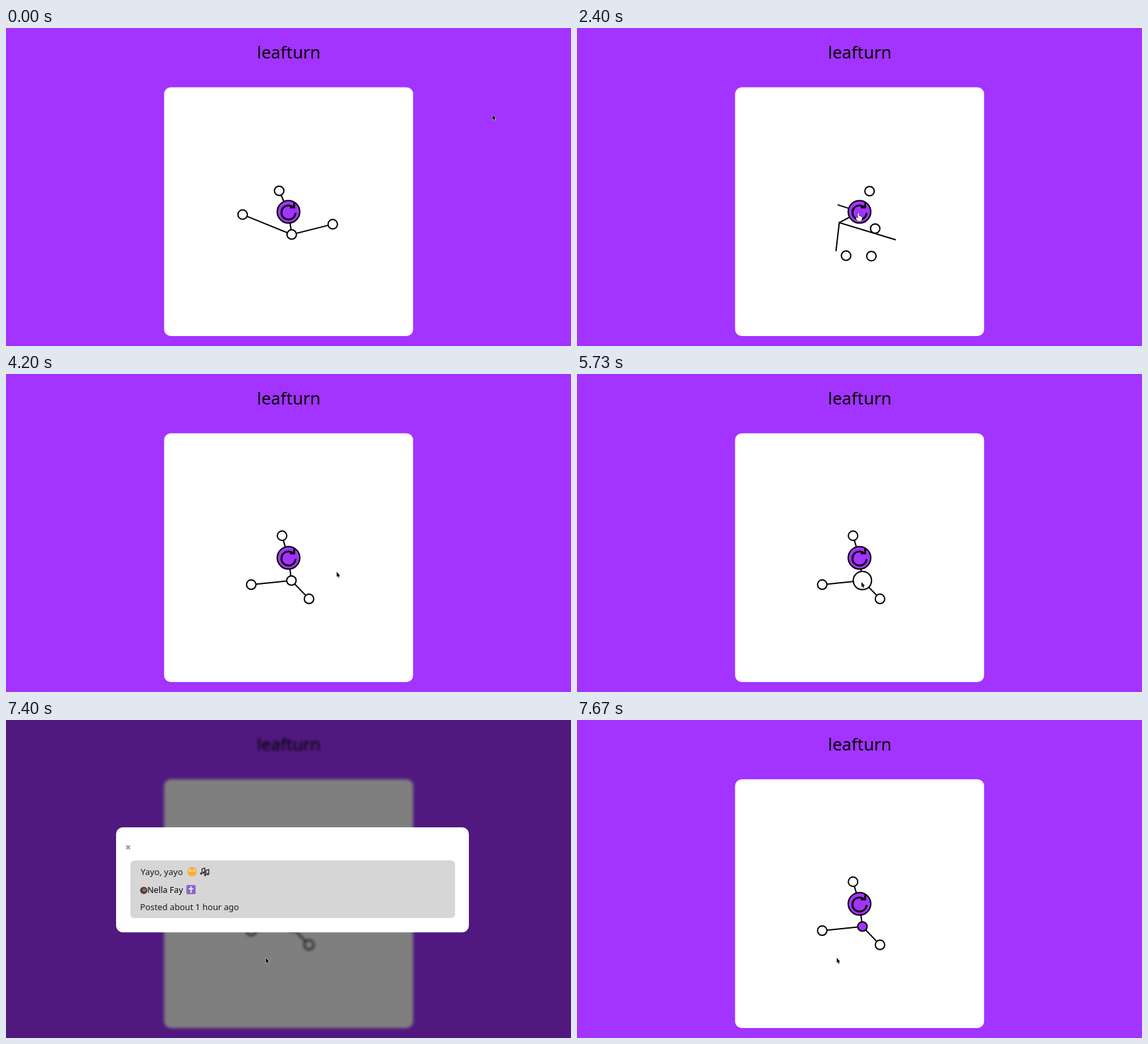
Write an HTML page with a canvas that moves like this. It is 852 px wide and 480 px high and loops after 8 s.

```html
<!DOCTYPE html>
<html lang="en">
<head>
<meta charset="utf-8">
<title>leafturn</title>
<style>
  html, body { margin: 0; width: 100%; height: 100%; overflow: hidden; background: #a333ff; }
  canvas { display: block; }
</style>
</head>
<body>
<canvas id="stage" width="852" height="480"></canvas>
<script>
const LOOP = 8000, W = 852, H = 480;
const PURPLE = '#a333ff', INK = '#1a1a1a', TAU = Math.PI * 2;
const FONT = '"Noto Sans", "Open Sans", sans-serif';
const HUB = { x: 426, y: 277.4 };
const RING = 34.65;
const OPEN = 5770, CLOSE = 7590;

const stage = document.getElementById('stage').getContext('2d');
const sceneCanvas = document.createElement('canvas');
sceneCanvas.width = W;
sceneCanvas.height = H;
const scene = sceneCanvas.getContext('2d');

// Directions from the hub in degrees: two inner nodes, then two outer ones
const trees = [
  { at: -1000, angles: [-114, 82, 176.5, 15.7] },
  { at: 1865, angles: [-64, 47, 107, 75] },
  { at: 2395, angles: [-162.3, 151.6, 120.8, 37.7] },
  { at: 2995, angles: [-106.3, 82.7, 144.2, 63.5] }
];

const glides = [
  { from: 270, to: 1070, x: 418, y: 279 },
  { from: 1100, to: 1330, x: 424.5, y: 279.5 },
  { from: 3430, to: 3870, x: 592, y: 233 },
  { from: 3870, to: 4200, x: 499, y: 298.5 },
  { from: 4200, to: 4620, x: 431, y: 319 },
  { from: 4620, to: 5130, x: 427, y: 315 },
  { from: 5240, to: 5330, x: 429, y: 314 },
  { from: 6760, to: 7400, x: 391.7, y: 359 }
];

const arrow = new Path2D('M0 0V7.6L1.7 6.2L3 9L4.2 8.4L3 5.8H5.2Z');
const hand = new Path2D('M-1 1Q0 -1 1 1V4L5.4 5.4V8L4 12H-1.4L-4 7.4L-3.4 6.2L-1 8Z');

const mix = (a, b, k) => a + (b - a) * k;
const ramp = (t, from, to) => Math.max(0, Math.min(1, (t - from) / (to - from)));
const smooth = k => k * k * (3 - 2 * k);
const easeOut = k => 1 - (1 - k) ** 2;
const cubic = k => k < 0.5 ? 4 * k ** 3 : 1 - (2 - 2 * k) ** 3 / 2;

function place(angles) {
  return angles.map((deg, i) => {
    const a = deg * Math.PI / 180, r = i < 2 ? RING : 2 * RING;
    return [HUB.x + r * Math.cos(a), HUB.y + r * Math.sin(a)];
  });
}

function pointerAt(t) {
  let x = 733.5, y = 131;
  for (const g of glides) {
    const k = easeOut(ramp(t, g.from, g.to));
    x = mix(x, g.x, k);
    y = mix(y, g.y, k);
  }
  return [x, y];
}

function box(c, x, y, w, h, r, fill) {
  c.beginPath();
  c.roundRect(x, y, w, h, r);
  c.fillStyle = fill;
  c.fill();
}

function disc(c, x, y, r, fill, outlined) {
  c.beginPath();
  c.arc(x, y, r, 0, TAU);
  c.fillStyle = fill;
  c.fill();
  if (outlined) c.stroke();
}

function line(c, ...points) {
  c.beginPath();
  points.forEach(([x, y]) => c.lineTo(x, y));
  c.stroke();
}

function text(c, str, x, y, size, color, weight = 400, align = 'left') {
  c.font = `${weight} ${size}px ${FONT}`;
  c.textAlign = align;
  c.fillStyle = color;
  c.fillText(str, x, y);
}

function drawButton(c) {
  disc(c, HUB.x, HUB.y, 17, PURPLE, true);
  c.lineWidth = 2.8;
  c.beginPath();
  c.arc(HUB.x, HUB.y + 1.1, 10.7, 0.05, TAU * 0.87);
  c.stroke();
  line(c, [434.6, 264.2], [434.6, 270.8], [428, 270.8]);
}

function drawScene(c, t) {
  c.fillStyle = PURPLE;
  c.fillRect(0, 0, W, H);
  text(c, 'leafturn', 426.5, 45.5, 25.7, '#000', 500, 'center');
  box(c, 238.4, 89.5, 375.5, 375.4, 10, '#fff');

  const now = trees.findLastIndex(tree => tree.at <= t);
  const nodes = place(trees[now].angles);
  const before = place(trees[Math.max(0, now - 1)].angles);
  const k = cubic(ramp(t, trees[now].at + 5, trees[now].at + 265));
  const [leaf, branch, left, right] = nodes;

  // Links jump to the new layout while nodes glide there
  c.strokeStyle = '#000';
  c.lineWidth = 2;
  line(c, leaf, [HUB.x, HUB.y], branch);
  line(c, left, branch, right);

  const hover = smooth(ramp(t, 4400, 4640)) - smooth(ramp(t, 5810, 6000));
  nodes.forEach(([x, y], i) => {
    const isBranch = i === 1;
    const r = 7.1 + (isBranch ? 6.7 * hover : 0);
    const fill = isBranch && t >= CLOSE ? PURPLE : '#fff';
    disc(c, mix(before[i][0], x, k), mix(before[i][1], y, k), r, fill, true);
  });
  drawButton(c);
}

function drawFace(c, x, y) {
  box(c, x - 6.7, y - 7, 13.4, 14, 6, '#ffac33');
  for (const side of [-1, 1]) {
    disc(c, x + 2.8 * side, y - 1.8, 1.9, '#fff');
    disc(c, x + 2.8 * side, y - 2, 0.8, '#664500');
  }
}

function drawNote(c, x, y) {
  c.strokeStyle = '#3e2f3c';
  c.lineWidth = 1.5;
  line(c, [x, y], [x, y - 7], [x + 4.2, y - 8.2], [x + 4.2, y - 1.4]);
  disc(c, x - 1.2, y, 1.8, '#3e2f3c');
  disc(c, x + 3, y - 1.4, 1.8, '#3e2f3c');
}

function drawAuthor(c) {
  disc(c, 207.8, 257.2, 5.5, '#4d3a35');
  disc(c, 208.4, 256.8, 2.8, '#a0694f');
  text(c, 'Nella Fay', 213.3, 260.8, 12.6, '#000', 500);
  box(c, 272, 249, 14, 14, 2, '#9266cc');
  box(c, 278.3, 251, 1.5, 10, 0, '#fff');
  box(c, 275.5, 254, 7, 1.5, 0, '#fff');
}

function drawModal(c, t) {
  box(c, 0, 0, W, H, 0, 'rgba(0, 0, 0, 0.5)');
  box(c, 166, 162, 532, 158.5, 10, '#fff');
  c.strokeStyle = '#999';
  c.lineWidth = 2.2;
  for (const d of [-2.8, 2.8]) line(c, [184.1 - d, 189.4], [184.1 + d, 195]);
  box(c, 187.5, 212, 489.7, 87, 6, '#d6d6d6');
  text(c, 'Yayo, yayo', 203, 234, 13, INK);
  drawFace(c, 280.7, 229);
  drawNote(c, 295.6, 231.8);
  drawNote(c, 301.5, 234);
  if (t >= OPEN + 90) drawAuthor(c);
  text(c, 'Posted about 1 hour ago', 202.3, 287, 12.8, INK);
}

function drawPointer(c, t) {
  const [x, y] = pointerAt(t);
  const onButton = Math.hypot(x - HUB.x, y - HUB.y) < 18;
  const shape = onButton ? hand : arrow;
  c.save();
  c.translate(x, y);
  c.lineWidth = 1;
  c.strokeStyle = onButton ? '#000' : '#fff';
  c.fillStyle = onButton ? '#fff' : '#000';
  c.stroke(shape);
  c.fill(shape);
  c.restore();
}

function draw(t) {
  if (t >= OPEN && t < CLOSE) {
    drawScene(scene, t);
    box(stage, 0, 0, W, H, 0, PURPLE);
    stage.filter = 'blur(2.2px)';
    stage.drawImage(sceneCanvas, 0, 0);
    stage.filter = 'none';
    drawModal(stage, t);
  } else {
    drawScene(stage, t);
  }
  drawPointer(stage, t);
}

const start = performance.now();
function tick() {
  draw((performance.now() - start) % LOOP);
  requestAnimationFrame(tick);
}
tick();
</script>
</body>
</html>
```
